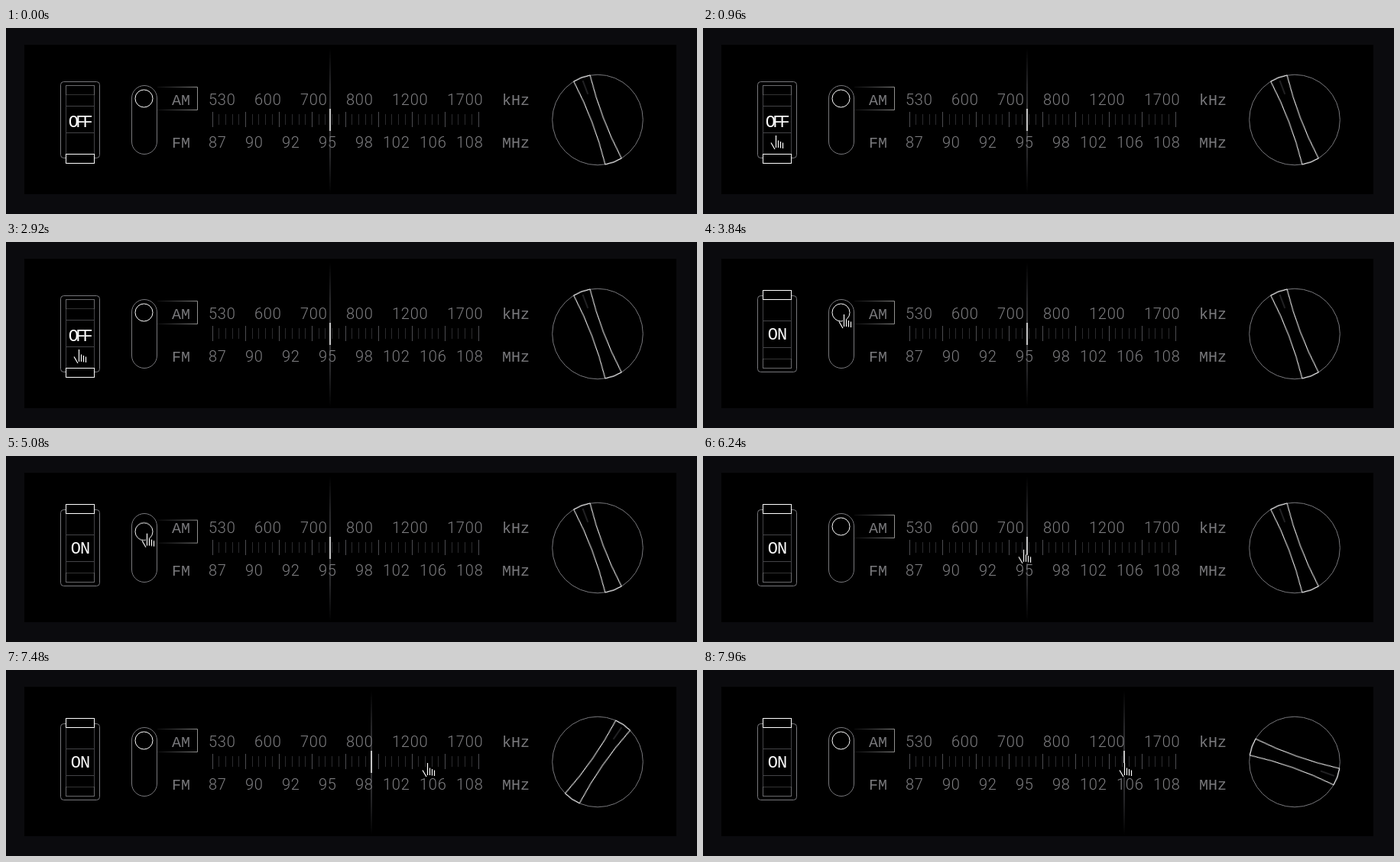
These frames come from a looping animation (904 by 244 pixels, 8 s). An HTML page:

```html
<!DOCTYPE html>
<html lang="en">
<head>
<meta charset="utf-8">
<title>Radio</title>
<style>
  html, body { margin: 0; width: 100%; height: 100%; overflow: hidden; background: #000; }
  svg { display: block; width: 904px; height: 244px; --ease: cubic-bezier(.455, .03, .515, .955); }

  .line { fill: none; stroke: #78787c; }
  .dim { fill: none; stroke: #434347; }
  .hot { fill: none; stroke: #fff; }
  .scale { font: 300 20px Roboto, sans-serif; fill: #7f7f82; letter-spacing: .78px; }
  .mono { font: 20px "Liberation Mono", monospace; fill: #78787b; }
  .state { font-size: 22px; fill: #fff; text-anchor: middle; }

  .flip { animation: flip 8s var(--ease) infinite; }
  .slide { animation: slide 8s var(--ease) infinite; }
  #needle { animation: tune 8s var(--ease) infinite; }
  #bar { animation: turn 8s var(--ease) infinite; }
  #hand { animation: point 8s var(--ease) infinite; }

  /* rocker: off, on, off, on */
  @keyframes flip {
    0%, 12%, 30%, 37.25% { transform: translateY(var(--y0, 0px)); opacity: var(--o0, 1); }
    15.5%, 26.25%, 40.6%, 100% { transform: translateY(var(--y1, 0px)); opacity: var(--o1, 1); }
  }
  @keyframes slide {
    0%, 48.1%, 65.5%, 100% { transform: translateY(0); }
    56%, 57.4% { transform: translateY(56px); }
  }
  @keyframes tune {
    0%, 88.6% { transform: translateX(424px); }
    99.5%, 100% { transform: translateX(551px); }
  }
  @keyframes turn {
    0%, 88.6% { transform: translate(774px, 120.5px) rotate(-20.7deg); }
    99.5%, 100% { transform: translate(774px, 120.5px) rotate(109.5deg); }
  }
  @keyframes point {
    0% { transform: translate(452px, 248px); }
    10.5%, 41% { transform: translate(95px, 141px); }
    46.5%, 48.1% { transform: translate(184px, 95px); }
    56%, 57.4% { transform: translate(184px, 151px); }
    65.5%, 69.75% { transform: translate(184px, 95px); }
    80%, 81.25% { transform: translate(438px, 125px); }
    86.5%, 100% { transform: translate(551px, 122px); }
  }
</style>
</head>
<body>
<svg viewBox="0 0 904 244">
  <defs>
    <linearGradient id="fadeX" gradientUnits="userSpaceOnUse" x1="198" x2="251" y1="0" y2="0">
      <stop offset="0" stop-color="#78787c" stop-opacity=".1"/>
      <stop offset="1" stop-color="#929290"/>
    </linearGradient>
    <linearGradient id="fadeY" x2="0" y2="1">
      <stop offset="0" stop-color="#606066" stop-opacity="0"/>
      <stop offset=".25" stop-color="#606066" stop-opacity=".8"/>
      <stop offset=".5" stop-color="#78787c"/>
      <stop offset=".75" stop-color="#606066" stop-opacity=".8"/>
      <stop offset="1" stop-color="#606066" stop-opacity="0"/>
    </linearGradient>
  </defs>

  <rect width="904" height="244" fill="#0b0b0e"/>
  <rect x="24" y="22" width="853" height="196"/>

  <g id="power">
    <rect class="line" x="71.5" y="70.5" width="51" height="100" rx="4"/>
    <g class="flip" style="--y0: 12px">
      <rect x="78" y="63" width="38" height="103"/>
      <rect class="dim" x="78.5" y="63.5" width="37" height="102"/>
      <rect class="hot flip" x="78.5" y="63.5" width="37" height="12" style="--y0: 0px; --o0: .2"/>
      <rect class="hot flip" x="78.5" y="153.5" width="37" height="12" style="--y0: 0px; --o1: .2"/>
    </g>
    <path class="dim flip" d="M78 102.5h38M78 137.5h38" style="--y1: 1px"/>
    <text class="mono state flip" x="95.8" y="130" letter-spacing="-3.9" style="--y1: -2px; --o1: 0">OFF</text>
    <text class="mono state flip" x="97" y="130" letter-spacing="-1" style="--y1: -2px; --o0: 0">ON</text>
  </g>

  <g id="band">
    <path class="slide" d="M198 77.5H250.5V107.5H198" fill="none" stroke="url(#fadeX)"/>
    <rect class="line" x="164.5" y="75.5" width="33" height="90" rx="16.5"/>
    <circle class="hot slide" cx="180.5" cy="92.5" r="11.5"/>
  </g>

  <g id="dial">
    <g id="ticks"></g>
    <g id="labels"></g>
  </g>

  <g id="needle">
    <rect x="-.5" y="27" width="1" height="189" fill="url(#fadeY)"/>
    <rect x="-.75" y="106" width="1.5" height="29" fill="#f4f4f4"/>
  </g>

  <g id="tuner">
    <circle class="line" cx="774" cy="120.5" r="59.3"/>
    <g id="bar">
      <path class="hot" d="M-11.4 -58.2Q-4.4 0 -11.4 58.2A59.3 59.3 0 0 0 11.4 58.2Q4.4 0 11.4 -58.2A59.3 59.3 0 0 0 -11.4 -58.2Z"/>
      <path class="dim" d="M0 -55V-36"/>
    </g>
  </g>

  <g id="hand">
    <path d="M-1 0H1L2 6L10 9V17L0 19L-6 10L-1 14Z"/>
    <path class="hot" stroke-width="1.2" d="M-6 9.5L-1 18M.5 0V16M3.5 6.5V16M6.5 8V16.5M9.5 9.5V17"/>
  </g>
</svg>
<script>
  const add = (id, tag, attrs, text = '') => {
    const el = document.createElementNS('http://www.w3.org/2000/svg', tag);
    for (const key in attrs) el.setAttribute(key, attrs[key]);
    el.textContent = text;
    document.getElementById(id).append(el);
  };

  // labels sit on a 12px character grid
  const row = (y, items) => {
    for (const [col, text] of items) {
      const cls = /\d/.test(text) ? 'scale' : 'mono';
      add('labels', 'text', { class: cls, x: 265 + col * 12, y }, text);
    }
  };
  row(101, [[-4, 'AM'], [0, '530'], [5, '600'], [10, '700'], [15, '800'], [20, '1200'], [26, '1700'], [32, 'kHz']]);
  row(157, [[-4, 'FM'], [0, '87'], [4, '90'], [8, '92'], [12, '95'], [16, '98'], [19, '102'], [23, '106'], [27, '108'], [32, 'MHz']]);

  for (let i = 0; i <= 40; i++) {
    const major = i % 5 === 0;
    const x = Math.floor(270 + i * 8.7) + .5;
    add('ticks', 'path', {
      d: major ? `M${x} 110V130` : `M${x} 113V127`,
      stroke: major ? '#4c4c50' : '#2b2b2e'
    });
  }
</script>
</body>
</html>
```
